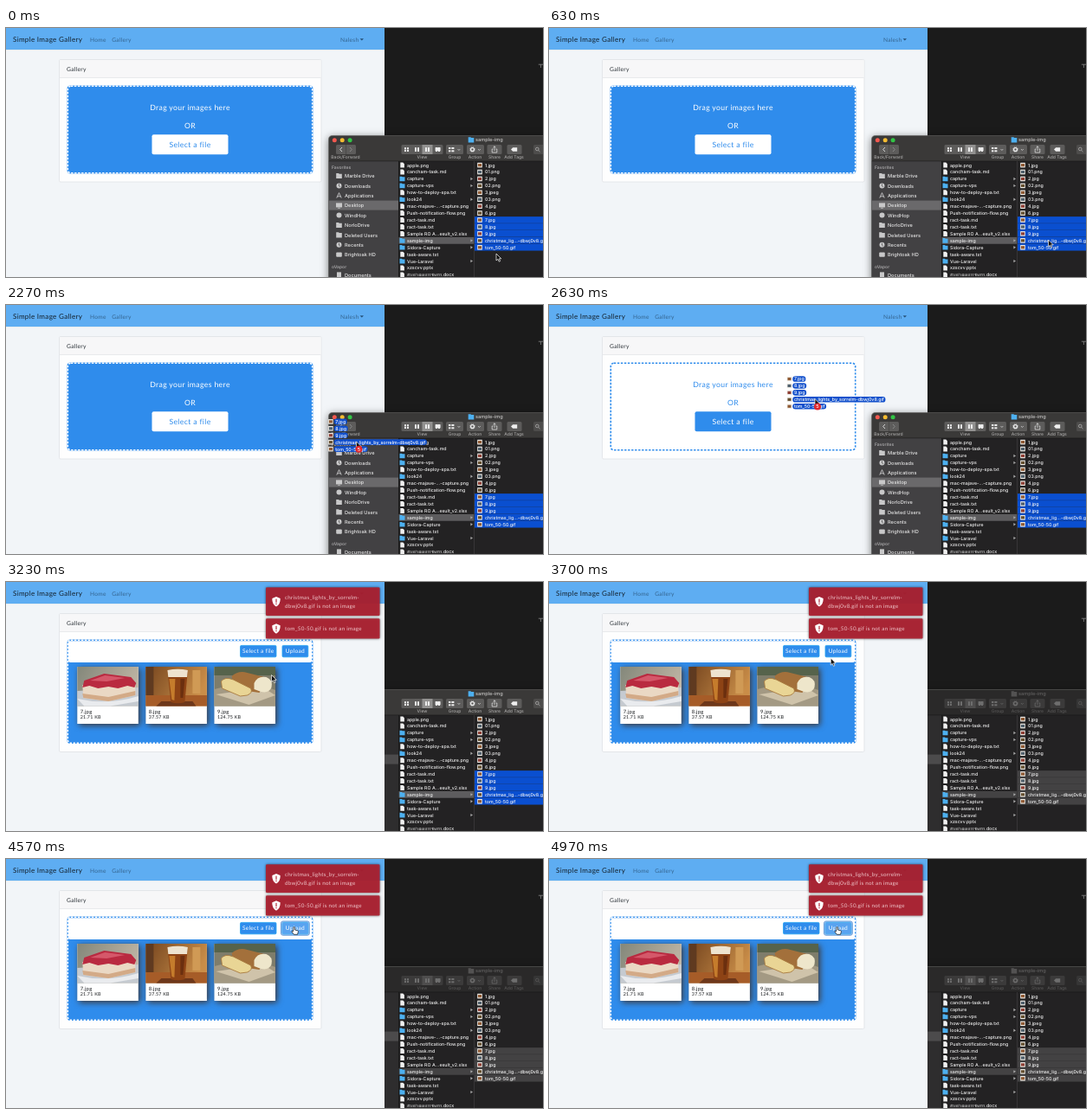
Write an HTML page that moves like this. It is 620 px wide and 288 px high and loops after 5010 ms.

```html
<!DOCTYPE html>
<html lang="en">
<head>
<meta charset="utf-8">
<title>Image gallery upload</title>
<style>
html, body { margin: 0; width: 100%; height: 100%; overflow: hidden; background: #1b1b1b; }
svg { display: block; width: 620px; height: 288px; }
text { text-rendering: geometricPrecision; white-space: pre; }
.web text { font-family: Lato, sans-serif; letter-spacing: .04em; }
.mac { font-family: Inter, "Noto Sans", sans-serif; font-weight: 500; }
.mid { text-anchor: middle; }
.zone { fill: #2f8cec; }
.dash { fill: none; stroke: #fff; stroke-width: 1.6; stroke-dasharray: 2.4 1.6; }
.zoneText, .pick { fill: #fff; }
.pickText { fill: #2f8cec; }
.over .zone, .over .pickText { fill: #fff; }
.over .dash { stroke: #2f8cec; }
.over .zoneText, .over .pick { fill: #2f8cec; }
.after, .dropped .before, .ring { display: none; }
.dropped .after { display: inline; }
.focus .ring { display: inline; }
#finder { filter: drop-shadow(0 2px 5px rgba(0,0,0,.5)); }
.dropped #finder { clip-path: url(#right); }
.bar { fill: #3a3938; }
.side { fill: #424143; }
.current { fill: #6a696b; }
.opened { fill: #5d5c5e; }
.picked { fill: #0a4fd0; }
.dropped .side { fill: #2e2d2e; }
.dropped .current { fill: #4c4b4c; }
.idle .bar { fill: #2a2929; }
.idle .tools { opacity: .35; filter: grayscale(1); }
.idle .picked, .idle .opened { fill: #434243; }
.card { filter: drop-shadow(2.2px 2.2px 3.6px #3e3737); }
.toast { filter: drop-shadow(0 .5px 1.5px rgba(0,0,0,.65)); }
</style>
</head>
<body>
<svg id="stage" viewBox="0 0 620 288"></svg>
<script>
const stage = document.getElementById('stage');
const $ = id => document.getElementById(id);
const rect = (x, y, w, h, fill, more = '') =>
  `<rect x="${x}" y="${y}" width="${w}" height="${h}" fill="${fill}" ${more}/>`;
const box = (x, y, w, h, name, more = '') =>
  `<rect class="${name}" x="${x}" y="${y}" width="${w}" height="${h}" ${more}/>`;
const text = (x, y, s, size, fill, more = '') =>
  `<text x="${x}" y="${y}" font-size="${size}" fill="${fill}" ${more}>${s}</text>`;
const path = (d, fill, more = '') => `<path d="${d}" fill="${fill}" ${more}/>`;
const circle = (x, y, r, fill, more = '') =>
  `<circle cx="${x}" cy="${y}" r="${r}" fill="${fill}" ${more}/>`;
const line = (d, color, w = .7) => path(d, 'none', `stroke="${color}" stroke-width="${w}"`);
const group = (s, more = '') => `<g ${more}>${s}</g>`;
const fade = (id, from, to) => `<linearGradient id="${id}" x1="0" y1="0" x2="1" y2=".35">` +
  `<stop stop-color="${from}"/><stop offset="1" stop-color="${to}"/></linearGradient>`;
const MID = 'class="mid"';

// Web page
const cardBox = h =>
  rect(61.5, 36.5, 302.5, h, '#fefefe', 'stroke="#dcdfe2" stroke-width=".7" rx="1.5"') +
  rect(62, 37, 301.5, 20.5, '#f7f7f8') + rect(62, 57.3, 301.5, .6, '#dcdfe2') +
  text(70, 49.5, 'Gallery', 6.7, '#2c3238');

const zone = h => box(70.5, 66.5, 284, h, 'zone', 'rx="4"') +
  box(71.3, 67.3, 282.4, h - 1.6, 'dash', 'rx="3.6"');

const zoneText = (y, s) => `<text class="zoneText mid" x="212.5" y="${y}" font-size="8.7">${s}</text>`;

const button = (x, w, s) => rect(x, 73.4, w, 13.4, '#2f8cec', 'rx="1.3" stroke="#21a2f2" stroke-width=".8"') +
  text(x + w / 2, 82.4, s, 6.6, '#fff', MID);

const photos = [
  rect(0, 0, 70.5, 45.5, 'url(#wall)') + path('M0 28L70.5 24V45.5H0Z', '#c5cad0') +
  path('M0 37Q35 45 70.5 34V40L38 45.5H8Z', '#e9ebee') +
  path('M6 21L67 19V33L36 40L7 36Z', '#ead8c4') + path('M6 31L36 35L67 28V33L36 40L7 36Z', '#d3aa87') +
  path('M8 16L31 8L62 12L68 19L66 24L58 22L47 25L36 23L24 25L14 22L6 24Z', '#b92a40') +
  path('M15 16L32 10L55 13L34 17Z', '#d5586a'),

  rect(0, 0, 70.5, 45.5, 'url(#bar)') + rect(0, 0, 9, 33, '#5f3a20') + rect(54, 4, 9, 27, '#d09a55') +
  rect(0, 33, 70.5, 12.5, '#a65c28') + path('M18 40H54L58 45.5H12Z', '#6d371a') +
  path('M25 4H48.5L45 41Q37 43.5 29 41Z', '#8d4315') + path('M27 14H34L33 39L30 38Z', '#c57c2c') +
  path('M40 14H45L43 36H40Z', '#6b2f0f') + path('M25 4Q37 1.5 48.5 4L47.6 12H25.9Z', '#eee3cf'),

  rect(0, 0, 70.5, 45.5, '#7f7d6b') + rect(0, 0, 70.5, 10, '#56634b') +
  path('M0 26L40 16L70.5 27V45.5H0Z', '#a39983') + path('M2 32L40 44L70.5 33L56 24Z', '#cfc3aa') +
  path('M20 11Q28 4 38 7L62 13L52 30L24 26Z', '#a3703b') +
  path('M46 19Q50 10 60 12Q68 15 66 24Q63 31 54 29L46 26Z', '#eee6cb') +
  path('M8 17Q12 11 22 15L42 25Q45 30 38 33L30 34L9 25Z', '#e9d595', 'stroke="#a97b40" stroke-width=".9"')
];

const card = ([name, size], i) => {
  const x = 82.3 + i * 79.1;
  return group(rect(0, 0, 70.5, 66, '#fff') + photos[i] +
    text(3.4, 53.6, name, 5.9, '#15181b') + text(3.4, 60.4, size, 5.4, '#15181b'),
    `class="card" transform="translate(${x} 98)"`);
};

const toast = (id, y, h, lines) => group(
  rect(300, y, 131.5, h, '#ae2030', 'rx="1.2" fill-opacity=".92"') +
  group(path('M0-5.5L4.7-3.6Q5 3 0 6Q-5 3-4.7-3.6Z', '#fff') +
    rect(-.6, -3, 1.2, 4.2, '#b43140') + circle(0, 2.7, .75, '#b43140'),
    `transform="translate(312 ${y + h / 2})"`) +
  lines.map((s, i) => text(322, y + 14.1 + i * 10.1, s, 6.25, '#eec4c9')).join(''),
  `id="${id}" class="toast"`);

const page = group(
  rect(0, 0, 437, 288, '#f2f5f8') + rect(0, 25, 437, .6, '#dfe6ec') + rect(0, 0, 437, 25, '#5eadf2') +
  text(8, 16, 'Simple Image Gallery', 8.05, '#14212d') +
  text(97, 15.7, 'Home', 6.6, '#34648f') + text(122.3, 15.7, 'Gallery', 6.6, '#34648f') +
  text(386, 15.7, 'Nalesh', 6.6, '#34648f') + path('M408.6 12.2H413L410.8 14.5Z', '#255078') +
  group(cardBox(141.5) + zone(102) +
    zoneText(95.4, 'Drag your images here') + zoneText(116.3, 'OR') +
    box(168.5, 123.3, 88, 23, 'pick', 'rx="2"') +
    '<text class="pickText mid" x="212.5" y="138.2" font-size="8.7">Select a file</text>', 'class="before"') +
  group(cardBox(160) + zone(120.5) + rect(72, 68.2, 281, 24.8, '#fff', 'rx="2"') +
    box(317.5, 72, 32.8, 16.2, 'ring', 'rx="2.2" fill="#a9c6ec" stroke="#6b9fdd" stroke-width="1"') +
    button(270.5, 41.5, 'Select a file') + button(319, 29.8, 'Upload') +
    box(319, 73.4, 29.8, 13.4, 'ring', 'fill="#fff" fill-opacity=".2"') +
    [['7.jpg', '21.71 KB'], ['8.jpg', '37.57 KB'], ['9.jpg', '124.75 KB']].map(card).join('') +
    toast('toast1', 6.2, 32.8, ['christmas_lights_by_sorrelm-', 'dbwj0v8.gif is not an image']) +
    toast('toast2', 42.2, 23.2, ['tom_50-50.gif is not an image']), 'class="after"'),
  'class="web"');

// File manager
const rowY = i => 158.6 + i * 7.93;
const folder = (x, y, fill = '#4db0f0', k = 1) =>
  path('M-3-2.8H-.5L.3-2.1H3V2.8H-3Z', fill, `transform="translate(${x} ${y}) scale(${k})"`);
const thumb = (x, y, i) => rect(x - 2.8, y - 2.8, 5.6, 5.6, '#efece6') +
  rect(x - 2, y - 1.6, 4, 3.2, ['#8f5a34', '#50606c', '#8e3f35', '#655030'][i % 4]);

const files = ['apple.png', 'cancham-task.md', 'capture/', 'capture-vps/', 'how-to-deploy-spa.txt', 'look24/',
  'mac-majave-...-capture.png', 'Push-notification-flow.png', 'ract-task.md', 'ract-task.txt',
  'Sample RO A...esult_v2.xlsx', 'sample-img/', 'Sidora-Capture/', 'task-aware.txt', 'Vue-Laravel/',
  'xzscvv.pptx', 'ตัวอย่างผลการจัดสรร.docx'];
const images = ['1.jpg', '01.png', '2.jpg', '02.png', '3.jpeg', '03.png', '4.jpg', '6.jpg', '7.jpg', '8.jpg',
  '9.jpg', 'christmas_lig...-dbwj0v8.gif', 'tom_50-50.gif'];
const places = ['Marble Drive', 'Downloads', 'Applications', 'Desktop', 'WindHop', 'NorloDrive',
  'Deleted Users', 'Recents', 'Brightoak HD'];

const fileRow = (name, i) => {
  const y = rowY(i), dir = name.endsWith('/');
  return (dir ? folder(457.5, y) + path(`M536.4 ${y - 1.7}l2.6 1.7l-2.6 1.7Z`, '#a9a9a9')
    : path(`M455.3 ${y - 3}h3l1.6 1.6v4.4h-4.6Z`, '#f0f0f0')) +
    text(463, y + 1.9, name.replace('/', ''), 5.25, '#f2f2f2');
};
const imageRow = (name, i) => thumb(547, rowY(i), i) + text(553, rowY(i) + 1.9, name, 5.25, '#f4f4f4');

const placeIcon = (i, y) => {
  const c = '#c8c8c9';
  if (i == 1 || i == 7) return circle(384.5, y, 3, c) + line(`M384.5 ${y - 2}v2.4l1.4 1`, '#444');
  if (i == 2) return line(`M381.8 ${y + 2.8}l2.7-6l2.7 6M382.6 ${y + 1}h4`, c, .9);
  if (i == 3) return rect(381, y - 2.8, 7, 5, c) + rect(383, y + 2.6, 3, .8, c);
  if (i == 4) return circle(384.5, y, 3, c);
  if (i == 8) return rect(381.2, y - 2.6, 6.6, 5.2, c, 'rx="1"');
  return folder(384.5, y, c, 1.1);
};
const place = (s, i) => {
  const y = 171 + i * 11.4;
  return placeIcon(i, y) + text(391, y + 2.1, s, 5.65, '#e3e3e3');
};

const tool = (x, w, label, mid) => rect(x, 135, w, 11, '#5d5c5b', 'rx="1.5"') +
  text(mid, 151.4, label, 5, '#a9a8a7', MID);
const toolbar = group(
  tool(381, 23, 'Back/Forward', 392) + rect(392.3, 135, .5, 11, '#3a3938') +
  line('M388 138l-2.3 2.5l2.3 2.5', '#e2e2e2', .9) + line('M397 138l2.3 2.5l-2.3 2.5', '#8c8c8c', .9) +
  tool(456.5, 48, 'View', 480.5) + rect(480.5, 135, 12, 11, '#929190') +
  [0, 1, 2, 3].map(i => rect(460 + i * 12, 138.2, 2, 4.8, '#eee') + rect(463 + i * 12, 138.2, 2, 4.8, '#eee')).join('') +
  line('M459 140.6h7', '#5d5c5b', .6) + rect(495.6, 138.2, 6, 4, '#eee') +
  tool(508, 20, 'Group', 518) + rect(511, 138, 2.4, 2, '#eee') + rect(514.4, 138, 3, 2, '#eee') +
  rect(511, 141.3, 2.4, 2, '#eee') + rect(514.4, 141.3, 3, 2, '#eee') +
  line('M521.5 140l1.4 1.5l1.4-1.5', '#ddd') +
  tool(532, 20, 'Action', 541.5) + circle(538.5, 140.5, 1.9, 'none', 'stroke="#eee" stroke-width="1.3"') +
  circle(538.5, 140.5, 2.8, 'none', 'stroke="#eee" stroke-width=".8" stroke-dasharray="1.1 1.1"') +
  line('M545 140l1.4 1.5l1.4-1.5', '#ddd') +
  tool(555.5, 17, 'Share', 564) + line('M562.4 140h-1.2v4h5.6v-4h-1.2M564 142v-5.2M562.6 138.2l1.4-1.4l1.4 1.4', '#eee') +
  tool(578.5, 17, 'Add Tags', 586.5) + path('M583 140.5l2.2-2.3h5v4.6h-5Z', '#eee') +
  rect(609, 135, 20, 11, '#4d4c4b', 'rx="1.5"') + circle(613.3, 140, 1.8, 'none', 'stroke="#bbb" stroke-width=".7"') +
  line('M614.7 141.4l1.8 1.8', '#bbb') +
  folder(537, 129.3, '#4db0f0', 1.1) + text(542, 131.4, 'sample-img', 5.6, '#c6c5c4'), 'class="tools"');

const finder = group(
  '<path class="bar" d="M372.5 300V129q0-4.5 4.5-4.5H640V300Z" stroke="#646362" stroke-width=".6"/>' +
  ['#f4584f', '#f6bd31', '#31c545'].map((c, i) => circle(379.3 + i * 8.9, 129.8, 2.5, c)).join('') + toolbar +
  box(372.8, 154, 80.2, 140, 'side') + rect(453, 154, 170, 140, '#232223') +
  rect(372.8, 153.7, 250, .5, '#111') + rect(453, 154, .5, 140, '#121212') + rect(540.2, 154, .6, 140, '#454445') +
  box(372.8, 199.6, 80.2, 11, 'current') +
  text(376, 162.8, 'Favorites', 5, '#a5a4a6', 'font-weight="600"') + places.map(place).join('') +
  text(376, 277.7, 'oVapor', 5, '#a5a4a6', 'font-weight="600"') +
  rect(382, 282.4, 5, 6, '#c8c8c9') + text(391, 288, 'Documents', 5.65, '#e3e3e3') +
  box(453.5, rowY(11) - 3.9, 86.7, 7.8, 'opened') + files.map(fileRow).join('') +
  [8, 9, 10, 11, 12].map(i => box(541, rowY(i) - 3.9, 80, 7.7, 'picked')).join('') +
  images.map(imageRow).join(''), 'id="finder" class="mac"');

// Dragged files and pointer
const dragged = images.slice(8).map((s, i) => {
  const y = rowY(i + 8), name = i == 3 ? 'christmas_lights_by_sorrelm-dbwj0v8.gif' : s;
  return thumb(547, y, i) + rect(550.8, y - 3.3, 0, 6.6, '#1250cc', 'rx="3.2"') + text(552.4, y + 1.9, name, 5.3, '#fff');
}).join('');

stage.innerHTML = '<clipPath id="right"><rect x="437" y="0" width="183" height="288"/></clipPath>' +
  fade('wall', '#83877a', '#bdb4a3') + fade('bar', '#75451f', '#c98d48') +
  rect(0, 0, 620, 288, '#1b1b1b') + line('M614.8 42.2H620M617.4 42.2V46', '#999') +
  page + finder + group(dragged, 'id="drag" class="mac"') +
  group(group(path('M0 0V8L1.9 6.3L3.2 9.2L4.6 8.6L3.3 5.8H5.8Z', '#111', 'stroke="#fff" stroke-width=".7"'), 'id="arrow"') +
    group(path('M-1.3-.5Q-.4-1.6.5-.5V2.5L3.6 3.2Q4.6 3.7 4.3 5L3.5 7.8H-.6L-3.1 4.5Q-3 3.2-1.3 4.1Z', '#fff',
      'stroke="#111" stroke-width=".7"'), 'id="hand"') +
    group(circle(3, 9, 4, '#e0262b') + text(3, 11, '5', 5.6, '#fff', 'class="mac mid"'), 'id="badge"'), 'id="pointer"');

for (const label of $('drag').querySelectorAll('text'))
  label.previousElementSibling.setAttribute('width', label.getComputedTextLength() + 3.2);

// Timing in milliseconds
const LOOP = 5010, GRAB = 1820, DROP = 2860, BLUR = 3480, PRESS = 4480;
const moves = [[60, 566, 261], [610, 576.5, 245], [GRAB, 576.5, 245], [2580, 307, 108.5],
  [3300, 306.5, 107.5], [3960, 335, 78], [4200, 335, 78], [4450, 333, 79.5]];
const clamp = v => Math.max(0, Math.min(1, v));
const ease = v => v * v * (3 - 2 * v);

function pointerAt(t) {
  let [, x, y] = moves[0];
  for (let i = 1; i < moves.length; i++) {
    const [t0, x0, y0] = moves[i - 1], [t1, x1, y1] = moves[i];
    if (t < t0) break;
    const k = ease(clamp((t - t0) / (t1 - t0)));
    x = x0 + (x1 - x0) * k;
    y = y0 + (y1 - y0) * k;
  }
  return [x, y];
}

const show = (id, on) => $(id).style.display = on ? '' : 'none';
const shift = (id, x, y) => $(id).setAttribute('transform', `translate(${x} ${y})`);

function draw(now) {
  const t = now % LOOP, [x, y] = pointerAt(t);
  const dragging = t > GRAB && t < DROP, dropped = t >= DROP;
  const states = { over: dragging && x < 354 && y < 168, dropped, idle: t >= BLUR, focus: t >= PRESS };
  stage.setAttribute('class', Object.keys(states).filter(k => states[k]).join(' '));
  const onButton = dropped && x > 318 && y < 87;
  shift('pointer', x, y);
  show('arrow', !onButton);
  show('hand', onButton);
  show('badge', dragging);
  show('drag', dragging);
  shift('drag', x - 576.5, y - 245);
  ['toast1', 'toast2'].forEach((id, i) => {
    const k = ease(clamp((t - DROP - i * 40) / 220));
    $(id).style.opacity = k;
    shift(id, 0, -8 * (1 - k));
  });
}

const start = performance.now();
(function tick() {
  draw(performance.now() - start);
  requestAnimationFrame(tick);
})();
</script>
</body>
</html>
```
